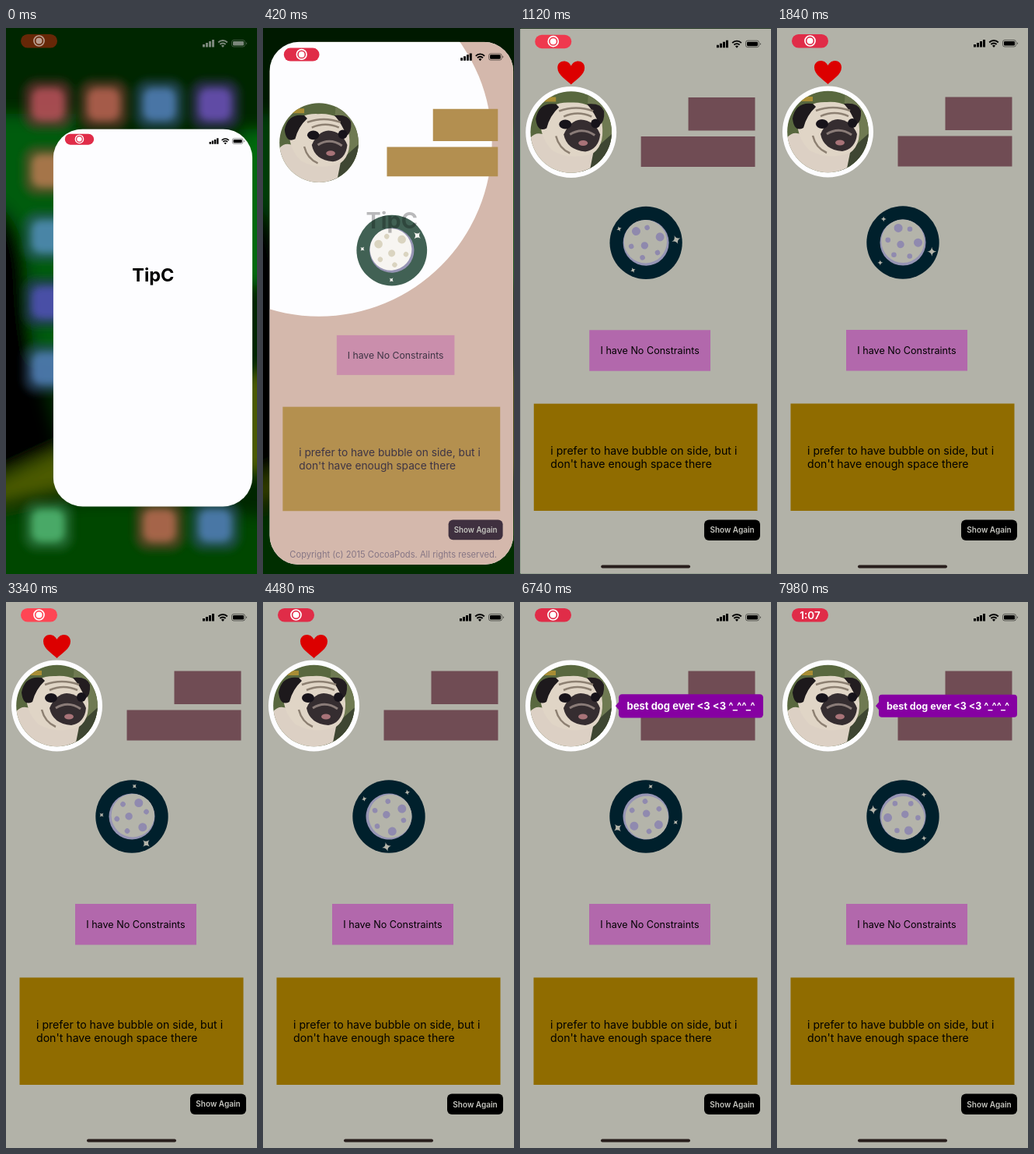
Write an HTML page that moves like this. It is 323 px wide and 700 px high and loops after 8000 ms.

```html
<!DOCTYPE html>
<html lang="en">
<head>
<meta charset="utf-8">
<title>TipC demo</title>
<style>
  html, body { margin: 0; width: 100%; height: 100%; overflow: hidden; background: #002800; }
  svg { display: block; width: 100vw; height: 100vh; }
  text { font-family: Inter, "Open Sans", sans-serif; }
</style>
</head>
<body>
<svg viewBox="0 0 323 700">
  <defs>
    <clipPath id="windowClip"><rect id="windowShape"/></clipPath>
    <clipPath id="photoClip"><circle cx="65.5" cy="133" r="52.3"/></clipPath>
    <filter id="soft" x="-20%" y="-20%" width="140%" height="140%"><feGaussianBlur stdDeviation="5"/></filter>
    <filter id="softer" x="-20%" y="-20%" width="140%" height="140%"><feGaussianBlur stdDeviation="10"/></filter>
    <g id="recordIcon">
      <circle cx="42.5" cy="16.5" r="6.5" fill="none" stroke="#fff" stroke-width="1.7"/>
      <circle cx="42.5" cy="16.5" r="4" fill="#fff"/>
    </g>
    <g id="statusIcons" fill="currentColor">
      <path d="M253 21h3v3.500h-3zM257 19h3v5.500h-3zM261 17h3v7.500h-3zM265 15h3v9.500h-3z"/>
      <path d="M273.200 18.500a8 8 0 0 1 11.600 0M275.400 21a5 5 0 0 1 7.200 0" fill="none" stroke="currentColor" stroke-width="1.9"/>
      <path d="M279 25l-2-2.300a3 3 0 0 1 4 0z"/>
      <rect x="290.500" y="15.500" width="17" height="8.500" rx="2.500" fill="none" stroke="currentColor" stroke-opacity=".5"/>
      <rect x="292" y="17" width="14" height="5.500" rx="1.300"/>
      <path d="M309 18v3.500q1.500-1.700 0-3.500z"/>
    </g>
    <path id="star" d="M0-6Q.6-.6 6 0Q.6.6 0 6Q-.6.6-6 0Q-.6-.6 0-6z"/>
  </defs>

  <rect width="323" height="700" fill="#002600"/>
  <g filter="url(#softer)">
    <path d="M-30 110H90V420H-30z" fill="#005c10"/>
    <path d="M-30 220Q25 230 28 330T70 540L-30 580z" fill="#000"/>
    <path d="M-30 590Q80 530 350 430V570Q150 570-30 615z" fill="#4c5a00"/>
    <path d="M-30 625Q150 590 350 630V730H-30z" fill="#004600"/>
    <path d="M300 130H350V330H300z" fill="#006a10"/>
  </g>
  <g id="icons" filter="url(#soft)"></g>
  <g id="homeStatus" color="#7c887c">
    <rect x="19" y="8" width="47" height="17.500" rx="8.700" fill="#682808"/>
    <g opacity=".55"><use href="#recordIcon"/></g>
    <use href="#statusIcons"/>
  </g>
  <rect id="shade" width="323" height="700"/>

  <g clip-path="url(#windowClip)">
    <g id="app">
      <rect width="323" height="720" fill="#fdfdff"/>
      <!-- data-from and data-to are the colours before and after the dimming -->
      <g id="content">
        <path id="dim" fill-rule="evenodd" data-from="#d4b8ac" data-to="#b2b2a8"/>
        <g clip-path="url(#photoClip)">
          <rect x="12" y="80" width="108" height="108" fill="#59683f"/>
          <path d="M88 80h36v110H80z" fill="#6f7a52"/>
          <path d="M90 160L124 130V190H76z" fill="#3e4632"/>
          <path d="M28 88h18v6H28z" fill="#a88d35"/>
          <path d="M8 190V148Q18 128 34 138L94 160 88 190z" fill="#dcd0c4"/>
          <path d="M26 112Q40 94 64 95 92 93 104 114 111 148 94 160 66 170 42 157 24 140 26 112z" fill="#e0d5c6"/>
          <path d="M46 97Q24 94 20 116 22 134 34 128 38 112 50 101z" fill="#1d191c"/>
          <path d="M86 97Q104 95 108 106 109 120 102 124 96 108 86 97z" fill="#231d20"/>
          <path d="M50 106Q72 98 94 106M56 113Q74 105 92 113M46 138Q50 154 64 160" fill="none" stroke="#8d8072" stroke-width="2.500"/>
          <path d="M56 136Q64 118 78 117 96 118 103 136 101 155 84 158 60 156 56 136z" fill="#352d30"/>
          <ellipse cx="58" cy="123" rx="8" ry="6" fill="#17131a"/>
          <ellipse cx="97" cy="122" rx="6" ry="6" fill="#17131a"/>
          <path d="M64 136Q80 126 96 137" fill="none" stroke="#8a7c78" stroke-width="3"/>
          <ellipse cx="81" cy="147" rx="6" ry="3.500" fill="#a87378"/>
        </g>
        <path d="M216.500 88.500H302.500V131H216.500zM155.500 138.500H302.500V177.500H155.500z" data-from="#b49050" data-to="#704c54"/>
        <rect x="89" y="387" width="156" height="52.500" data-from="#ca8eac" data-to="#b268ac"/>
        <rect x="17.500" y="481.500" width="288" height="137.500" data-from="#b49050" data-to="#906c00"/>
        <g data-from="#403646" data-to="#000000">
          <text x="167" y="418" font-size="12.600" text-anchor="middle">I have No Constraints</text>
          <text x="39" y="547" font-size="14.150">i prefer to have bubble on side, but i</text>
          <text x="39" y="564" font-size="14.150">don't have enough space there</text>
        </g>
        <rect x="237" y="630.500" width="72" height="26.500" rx="6" data-from="#403040" data-to="#000000"/>
        <text x="273" y="647.500" font-size="10" font-weight="600" fill="#c4c4be" text-anchor="middle">Show Again</text>
        <circle cx="162" cy="275" r="46.700" data-from="#426254" data-to="#00202c"/>
        <g id="moon" data-from="#f8f6f2" data-to="#b4b4aa">
          <circle r="29.500" fill="#9694b4"/>
          <circle cy="-1.800" r="27.700"/>
          <g id="craters" fill-opacity=".7" data-from="#d0c8ac" data-to="#8078b0"></g>
          <g id="stars"></g>
        </g>
        <path id="heart" fill="#dc0000" d="M0 15C-6 9-17.500 3-17.500-6.500-17.500-17-4-18 0-9 4-18 17.500-17 17.500-6.500 17.500 3 6 9 0 15z"/>
        <g id="bubble">
          <path d="M-93 0L-88-6V6z" fill="#8600a2"/>
          <rect x="-89" y="-14.500" width="178" height="29" rx="4" fill="#8600a2"/>
          <text y="4.500" font-size="12.500" font-weight="700" fill="#fff" text-anchor="middle">best dog ever &lt;3 &lt;3 ^_^^_^</text>
        </g>
        <rect id="homeBar" x="104" y="688.500" width="115" height="4" rx="2" fill="#281e1c"/>
      </g>
      <text id="title" x="162" y="246" font-size="29.600" font-weight="700" text-anchor="middle">TipC</text>
      <text id="copyright" x="164" y="681" font-size="11.500" fill="#76687c" text-anchor="middle">Copyright (c) 2015 CocoaPods. All rights reserved.</text>
      <rect id="pill" x="19" y="8" width="47" height="17.500" rx="8.700"/>
      <g id="recording"><use href="#recordIcon"/></g>
      <text id="clock" x="42.500" y="21.700" font-size="13.500" font-weight="600" fill="#fff" text-anchor="middle">1:07</text>
      <use href="#statusIcons" color="#000"/>
    </g>
  </g>
</svg>
<script>
const LOOP = 8000, DIM_AT = 420, HEART_AT = 580, SWAP_AT = 6250, CLOCK_AT = 7000;
const $ = id => document.getElementById(id);
const set = (id, attrs) => {
  for (const [name, value] of Object.entries(attrs)) $(id).setAttribute(name, value);
};
const ramp = (t, from, to) => Math.max(0, Math.min(1, (t - from) / (to - from)));
const mix = (a, b, k) => `color-mix(in srgb, ${a}, ${b} ${100 * k}%)`;
const polar = (deg, r) => [r * Math.cos(deg * Math.PI / 180), r * Math.sin(deg * Math.PI / 180)];
const spring = ms => {
  const s = Math.max(0, ms) / 1000;
  return 1 - Math.exp(-10 * s) * (Math.cos(11 * s) + 10 / 11 * Math.sin(11 * s));
};

// Blurred home screen icons: a dim halo around a brighter core.
function addIcon(x, y, hue) {
  const square = (size, light, alpha) =>
    `<rect x="${x - size / 2}" y="${y - size / 2}" width="${size}" height="${size}" rx="${size * .28}" fill="hsl(${hue} 42% ${light}% / ${alpha})"/>`;
  $('icons').innerHTML += square(64, 32, .55) + square(42, 52, .85);
}
const column = i => 54 + 71.7 * i;
[355, 10, 212, 255].forEach((hue, i) => addIcon(column(i), 98, hue));
[25, 205, 240, 212].forEach((hue, i) => addIcon(54, 183 + 84.5 * i, hue));
[140, 15, 212].forEach((hue, i) => addIcon(column(i && i + 1), 638, hue));

// One crater near the middle and six around it, every fourth one large.
const crater = ([x, y], r) => `<circle cx="${x}" cy="${y}" r="${r}"/>`;
let craters = crater([-3, 2.5], 4.7);
for (let i = 0; i < 6; i++) craters += crater(polar(63 * i - 62, 19.5), i % 4 === 1 ? 5.5 : 3.3);
$('craters').innerHTML = craters;
$('stars').innerHTML = [18, 139, 231].map((deg, i) =>
  `<use href="#star" transform="translate(${polar(deg, 39)}) scale(${i ? .6 : 1})"/>`).join('');

const tinted = document.querySelectorAll('[data-from]');

function render(t) {
  // The window settles into full screen exponentially.
  const rest = Math.exp(-t / 212);
  const scale = 1 - .207 * rest, x = 61 * rest, y = 130 * rest;
  set('app', { transform: `translate(${x} ${y}) scale(${scale})` });
  set('windowShape', { x, y, width: 323 * scale, height: 700 - 217 * rest, rx: 38 * (1 - ramp(t, 760, 1100)) });
  set('homeStatus', { opacity: 1 - ramp(t, 0, 300) });
  set('icons', { opacity: 1 - ramp(t, 100, 500) });
  set('shade', { opacity: .35 * ramp(t, 0, 420) });

  // The launch screen gives way to the content, dimmed except around the photo.
  set('content', { opacity: ramp(t, 230, 420) });
  set('title', { opacity: 1 - ramp(t, 120, 530) });
  set('copyright', { opacity: .9 * Math.sin(Math.PI * ramp(t, 40, 640)) });
  const r = 58.5 + 173.5 * Math.exp((DIM_AT - t) / 60);
  set('dim', { d: `M0 0H323V720H0zM${65.5 - r} 133a${r} ${r} 0 1 0 ${2 * r} 0a${r} ${r} 0 1 0 ${-2 * r} 0z` });
  const dimmed = 1 - Math.exp(-Math.max(0, t - DIM_AT) / 100);
  for (const el of tinted) el.setAttribute('fill', mix(el.dataset.from, el.dataset.to, dimmed));
  set('homeBar', { opacity: ramp(t, 450, 950) });

  // Steady turn that starts a little faster.
  const seconds = t / 1000;
  const turn = 28 * seconds - 48.7 - 16 * Math.exp(-seconds / 1.2);
  set('moon', { transform: `translate(162 275) rotate(${turn})` });

  const leaving = ramp(t, SWAP_AT, SWAP_AT + 180);
  set('heart', {
    transform: `translate(65.5 57) scale(${spring(t - HEART_AT) * (1 - leaving)})`,
    opacity: ramp(t, HEART_AT, HEART_AT + 220) * (1 - leaving)
  });
  const shown = t - SWAP_AT - 150;
  set('bubble', { transform: `translate(220 133.3) scale(${spring(shown)})`, opacity: ramp(shown, 0, 150) });

  const pulse = (.5 + .5 * Math.cos((t - 3340) / 1000 * Math.PI)) ** 6;
  set('pill', { fill: mix('#e02c48', '#ff4654', pulse) });
  const clock = ramp(t, CLOCK_AT, CLOCK_AT + 250);
  set('recording', { opacity: 1 - clock });
  set('clock', { opacity: clock });
}

const start = performance.now();
function tick() {
  render((performance.now() - start) % LOOP);
  requestAnimationFrame(tick);
}
tick();
</script>
</body>
</html>
```
